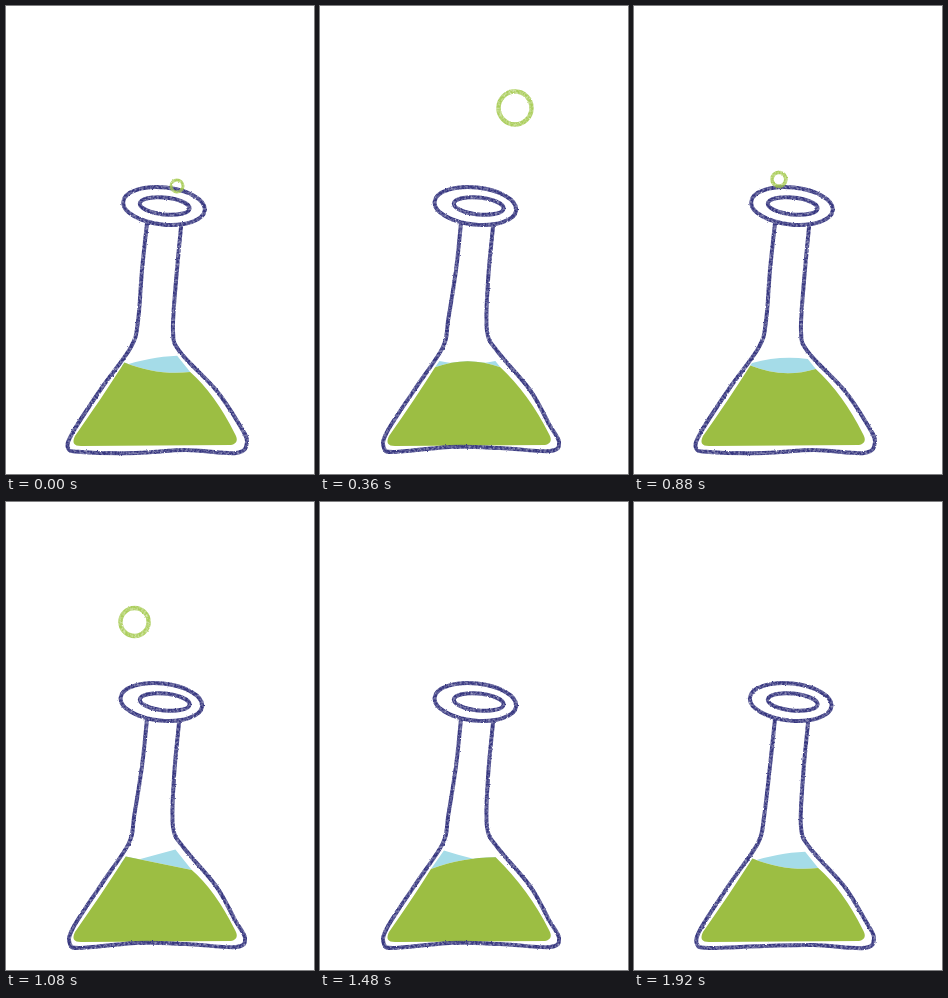
These frames come from a looping animation (308 by 468 pixels, 1960 ms). An HTML page:

```html
<!DOCTYPE html>
<html lang="en">
<head>
<meta charset="utf-8">
<title>Bubbling flask</title>
<style>
  html, body { margin: 0; width: 100%; height: 100%; overflow: hidden; background: #fff; }
  svg { display: block; }
  .line { fill: none; stroke-linecap: round; stroke-linejoin: round; filter: url(#crayon); }
</style>
</head>
<body>
<svg width="308" height="468" viewBox="0 0 308 468">
  <filter id="crayon" filterUnits="userSpaceOnUse" x="0" y="0" width="308" height="468" color-interpolation-filters="sRGB">
    <feTurbulence id="noise" type="fractalNoise" baseFrequency=".45" numOctaves="2" result="n"/>
    <feDisplacementMap in="SourceGraphic" in2="n" scale="2" xChannelSelector="R" yChannelSelector="G" result="d"/>
    <feColorMatrix in="n" values="0 0 0 0 0  0 0 0 0 0  0 0 0 0 0  0 0 1 0 .35" result="grain"/>
    <feComposite in="d" in2="grain" operator="in"/>
  </filter>
  <path id="back" fill="#a5dce8"/>
  <path id="liquid" fill="#9cbe43"/>
  <path id="glass" class="line" stroke="#36367f" stroke-width="4"/>
  <path id="bubbles" class="line" stroke="#a3c94c"/>
</svg>
<script>
const $ = id => document.getElementById(id);
const STEP = 40, COUNT = 49, SLOSH = 24, RISE = 11, NEXT = 19;

function ellipse(cx, cy, rx, ry = rx, deg = 0) {
  const a = deg * Math.PI / 180, x = rx * Math.cos(a), y = rx * Math.sin(a);
  const half = `A${rx},${ry} ${deg} 0 1 `;
  return `M${cx - x},${cy - y}${half}${cx + x},${cy + y}${half}${cx - x},${cy - y}`;
}

// Smooth open curve through points.
function spline(pts) {
  const at = i => pts[Math.max(0, Math.min(pts.length - 1, i))];
  let d = 'M' + pts[0];
  for (let i = 0; i < pts.length - 1; i++) {
    const [p, q, r, s] = [-1, 0, 1, 2].map(o => at(i + o));
    const c1 = q.map((v, j) => v + (r[j] - p[j]) / 6);
    const c2 = r.map((v, j) => v - (s[j] - q[j]) / 6);
    d += `C${c1} ${c2} ${r}`;
  }
  return d;
}

// The hand-drawn line wavers with e from -1 to 1.
function drawGlass(e) {
  const body = [
    [141, 217], [136, 264], [130 + 2 * e, 315], [124 + e, 341], [95, 383], [67, 426],
    [63 - e, 442], [75, 446], [130, 444 + 3 * e], [180, 443 + e], [230, 446 + e],
    [240 + e, 436], [231 + 2 * e, 418], [210, 384], [176 - 2 * e, 346], [167, 325],
    [169 + e, 275], [174 + e, 221]
  ];
  $('noise').setAttribute('seed', e + 2);
  $('glass').setAttribute('d', ellipse(156.7 + 1.3 * e, 200, 41, 18.5, 6) +
    ellipse(158.7, 200, 25, 8.5, 6) + spline(body));
}

// A liquid edge from wall to wall: four cubic control points.
function edge(base, tilt, sag) {
  const yl = base - tilt, yr = base + tilt;
  const xl = 118 - (yl - 357) * .7, xr = 177 + (yr - 357) * .8;
  return [0, 1 / 3, 2 / 3, 1].map(k =>
    [xl + (xr - xl) * k, yl + (yr - yl) * k + (k % 1 ? sag : 0)]);
}

// Front and back edges rock against each other.
function drawLiquid(n) {
  const phase = 2 * Math.PI * (n + 3) / SLOSH;
  const tilt = Math.sin(phase), sag = Math.cos(phase);
  const [l, a, b, r] = edge(361.2, 6.8 * tilt, 8 * sag);
  const [bl, ba, bb, br] = edge(355, -7.5 * tilt, -4 * sag);
  $('back').setAttribute('d', `M${l}L${bl}C${ba} ${bb} ${br}L${r}C${b} ${a} ${l}Z`);
  $('liquid').setAttribute('d', `M${l}C${a} ${b} ${r}Q209,388 229,428` +
    `Q234,437 225,439L75,440Q64,440 69,430Q95,393 ${l}Z`);
}

// A bubble speeds up as it rises, then bursts along the diagonals.
function drawBubble(age, x, dir) {
  const k = (Math.min(age, RISE) / 9) ** 2.23, burst = age - RISE;
  const cx = x + dir * 24 * k, cy = 180 - 78 * k;
  const ray = (u, v) => {
    const at = s => `${cx + u * s},${cy + v * s}`;
    return `M${at(16 + 8 * burst)}L${at(30 + 4.7 * burst)}`;
  };
  const d = burst < 0 ? ellipse(cx, cy, 6 + 10.5 * k)
    : burst < 4 ? ray(-1, -1) + ray(1, -1) + ray(1, 1) + ray(-1, 1) : '';
  const b = $('bubbles');
  b.setAttribute('d', d);
  b.setAttribute('stroke-width', burst < 0 ? 3 + Math.min(1.5, age / 5) : 3 - burst / 3);
  b.setAttribute('opacity', burst < 0 ? .9 : Math.max(0, .9 - burst / 5));
}

function draw(now) {
  const n = Math.floor(now / STEP) % COUNT;
  const pose = Math.floor(3 * ((.13 + .825 * n) % 1));
  drawGlass([1, -1, 0][pose]);
  drawLiquid(n);
  if (n < NEXT) drawBubble(n, 171, 1);
  else drawBubble(n - NEXT, 147, -1);
}

const begin = performance.now();
(function tick() {
  draw(performance.now() - begin);
  requestAnimationFrame(tick);
})();
</script>
</body>
</html>
```
